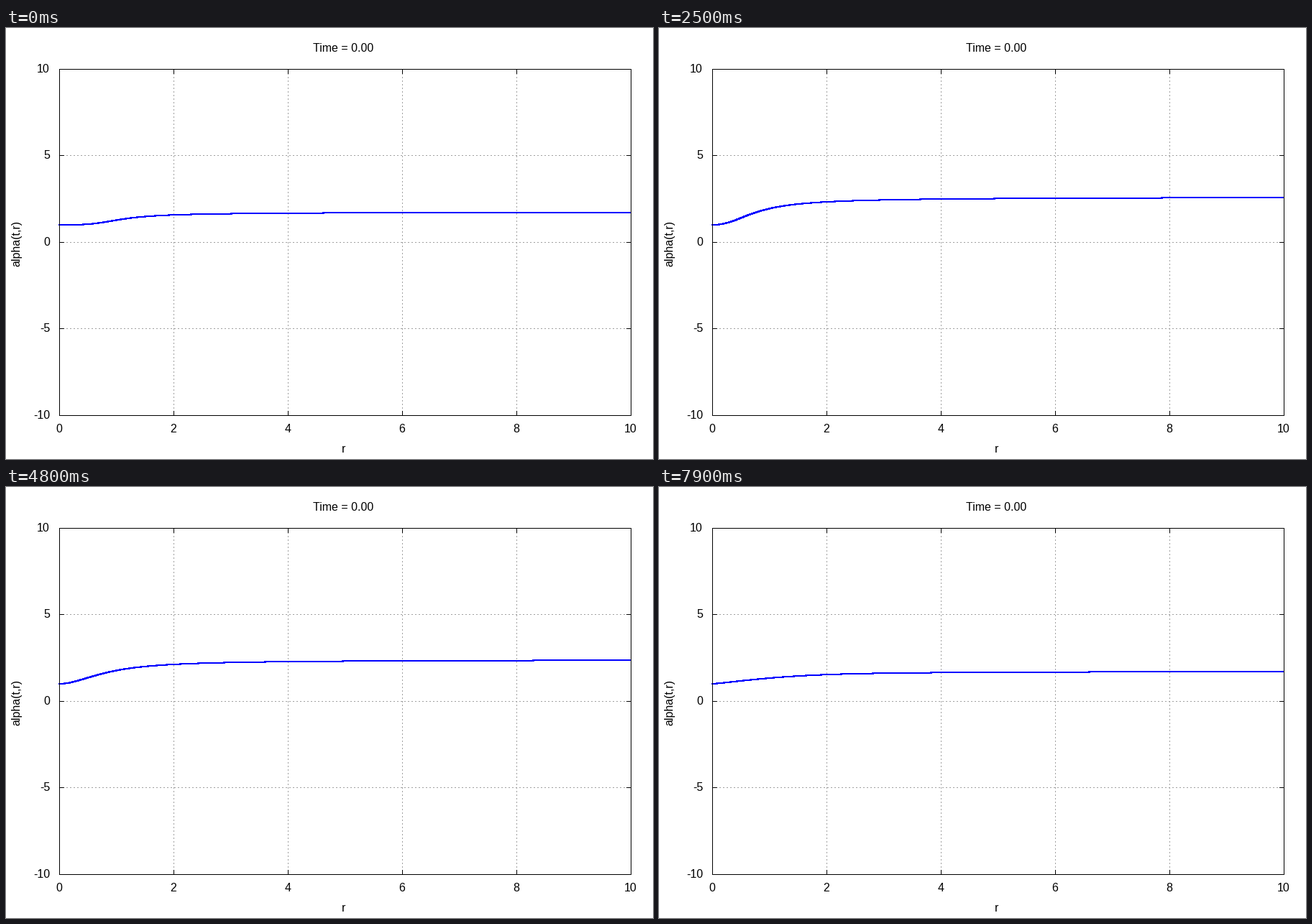
These frames come from a looping animation (900x600 px, 8000 ms). A matplotlib script:

```python
import numpy as np
import matplotlib.pyplot as plt
from matplotlib.animation import FuncAnimation

plt.rcParams["font.family"] = "Liberation Sans"
plt.rcParams["path.simplify"] = False

W, H, DPI = 900, 600, 100
FRAMES, INTERVAL = 80, 100
PX = 72 / DPI                                # one pixel in points
LEFT, RIGHT, TOP, BOTTOM = 74, 869, 57, 539
ZERO, UNIT = 298, 24.1                       # row of alpha = 0, pixels per unit
MASS = 0.22
PEAK = 3.6                                   # time of the strongest pulse, seconds

xs = np.arange(LEFT, RIGHT + 1)
radius = np.maximum((xs - LEFT) / (RIGHT - LEFT) * 10, 1e-6)


def curve(t):
    """Pixel rows of the lapse: 1 at the centre, far * (1 - MASS / r) far out."""
    width = 1.79 if t < PEAK else 1.48
    pulse = np.exp(-((t - PEAK) / width) ** 2)
    far = 1.735 + 1.295 * pulse
    power = 2.5 - .13 * t + .4 * pulse + 1.5 * np.exp(-3 * t)
    size = .92 - .66 * pulse + .75 * np.exp(-1.5 * t)
    tail = MASS * far / (far - 1) / radius
    core = size / (radius ** power + .25 * radius ** 4)
    alpha = 1 + (far - 1) / (1 + tail + core)
    return np.floor(ZERO - alpha * UNIT + .5)


fig = plt.figure(figsize=(W / DPI, H / DPI), dpi=DPI, facecolor="white")
ax = fig.add_axes([0, 0, 1, 1])
ax.set(xlim=(0, W), ylim=(H, 0))
ax.axis("off")


def rule(x0, y0, x1, y1, color="black", z=4, style="-"):
    ax.plot([x0 + .5, x1 + .5], [y0 + .5, y1 + .5], color=color, lw=PX, ls=style,
            antialiased=False, snap=False, zorder=z, solid_capstyle="projecting")


def label(x, y, text, ha="center", **kw):
    ax.text(x, y, text, ha=ha, va="baseline", fontsize=16 * PX, color="black", **kw)


DOTS = dict(color="#a0a0a0", z=1, style=(0, (2, 3)))
TICK = 6

for k in range(6):
    x = LEFT + 159 * k
    label(x, 563, str(2 * k))
    if 0 < k < 5:
        rule(x, BOTTOM, x, TOP, **DOTS)
        rule(x, BOTTOM, x, BOTTOM - TICK)
        rule(x, TOP, x, TOP + TICK)

for v in range(-10, 11, 5):
    y = int(ZERO - v * UNIT)
    label(61, y + 5, str(v), ha="right")
    if abs(v) < 10:
        rule(LEFT, y, RIGHT, y, **DOTS)
        rule(LEFT, y, LEFT + TICK, y)
        rule(RIGHT, y, RIGHT - TICK, y)

for y in (TOP, BOTTOM):
    rule(LEFT, y, RIGHT, y)
for x in (LEFT, RIGHT):
    rule(x, TOP, x, BOTTOM)

label(469, 33, "Time = 0.00")
label(469.5, 591, "r")
label(19, 300, "alpha(t,r)", rotation=90, rotation_mode="anchor")

line, = ax.plot([], [], color="#0000ff", lw=2 * PX, antialiased=False, snap=False,
                solid_capstyle="projecting", zorder=3)


def update(i):
    line.set_data(xs, curve(i * INTERVAL / 1000))
    return line,


anim = FuncAnimation(fig, update, frames=FRAMES, interval=INTERVAL,
                     repeat=True, repeat_delay=0, blit=False)
plt.show()
```
